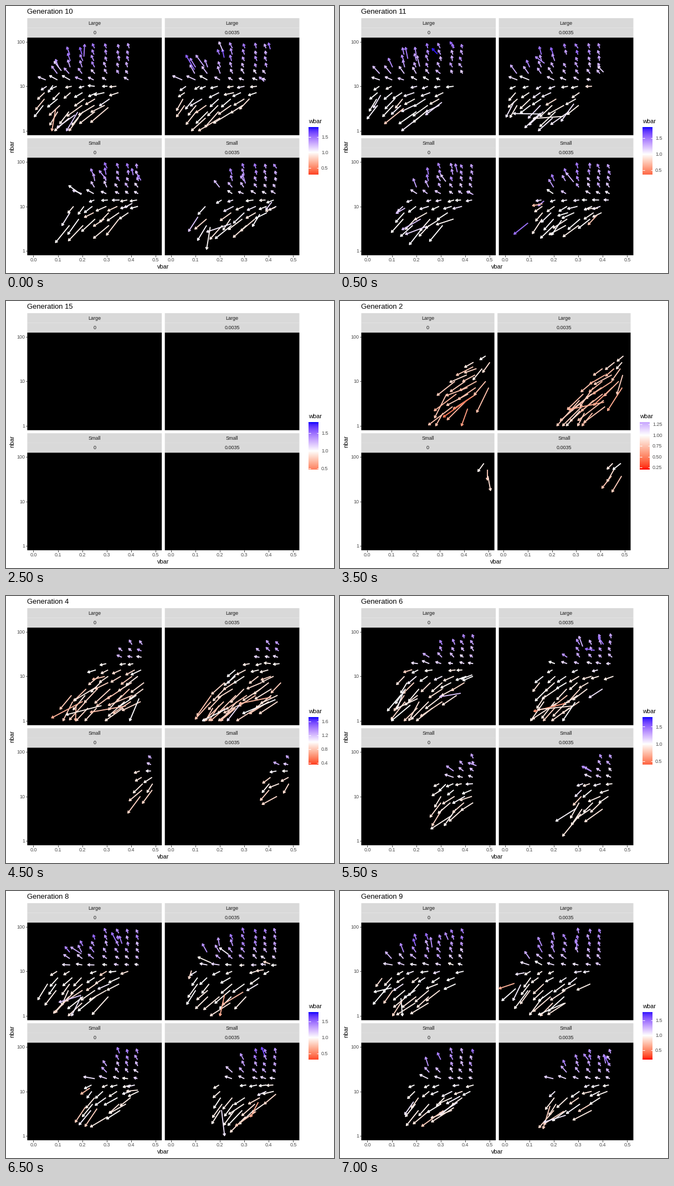
Write a matplotlib script that moves like this. It is 592 px wide and 483 px high and loops after 7500 ms.

```python
import numpy as np
import matplotlib.pyplot as plt
from matplotlib.animation import FuncAnimation
from matplotlib.collections import LineCollection
from matplotlib.patches import Rectangle

W, H, DPI = 592, 483, 100
PX = 72 / DPI
LEFT, TOP, GAP = 38.4, 22, 5.5
STRIP, TALL = 17.6, 176.5
DECADE = TALL / 2.2
FLOOR = TOP + 2 * STRIP + TALL - DECADE / 10    # height of nbar = 1
plt.rcParams["font.family"] = "Liberation Sans"

# How the cloud of arrows spreads: values at key generations, in pixels
KEYS = (1, 2, 4, 7, 10, 13)
CLOUD = {
    "Large": dict(left=(264, 195, 122, 102, 77, 76), right=(264, 262, 245, 240, 222, 220),
                  edge=(95, 170, 182, 142, 130, 118), top=(95, 99, 82, 78, 76, 75),
                  low_left=(150, 205, 200, 178, 178, 172), low_right=(150, 154, 187, 130, 140, 105),
                  hump=(0, 12, 10, 45, 42, 55), level=(65, 90, 118, 134, 141, 140)),
    "Small": dict(left=(264, 264, 240, 170, 125, 104), right=(264, 264, 261, 241, 240, 236),
                  edge=(72, 70, 104, 125, 142, 128), top=(72, 70, 74, 75, 74, 76),
                  low_left=(80, 105, 152, 183, 177, 157), low_right=(80, 105, 132, 152, 140, 136),
                  hump=(0, 0, 5, 20, 25, 30), level=(60, 60, 98, 127, 129, 137)),
}


def over(gen, keys, values):
    return np.interp(gen, keys, values)


def scale(gen):
    """Fitness range and legend step."""
    lo = over(gen, (1, 2, 4, 7, 9, 13, 15), (.3, .2, .35, .43, .19, .54, .47))
    hi = over(gen, (1, 2, 4, 7, 9, 13, 15), (1.2, 1.3, 1.72, 1.81, 1.78, 1.92, 1.82))
    return lo, hi, .25 if gen in (1, 2, 3, 7) else .4 if gen == 4 else .5


def palette(t):
    """Red - white - blue for t in -1..1, blended in CIE Lab."""
    t = np.clip(np.atleast_1d(t), -1, 1)[:, None]
    white, red, blue = np.array([[100, 0, 0], [53.24, 80.09, 67.2], [32.3, 79.19, -107.86]])
    L, a, b = (white + np.abs(t) * (np.where(t < 0, red, blue) - white)).T
    fy = (L + 16) / 116
    f = np.array([fy + a / 500, fy, fy - b / 200])
    xyz = np.where(f > 6 / 29, f ** 3, (f - 4 / 29) * 3 * (6 / 29) ** 2)
    xyz *= np.array([[.9505], [1], [1.089]])
    rgb = np.array([[3.2406, -1.5372, -.4986], [-.9689, 1.8758, .0415],
                    [.0557, -.204, 1.057]]) @ xyz
    rgb = np.clip(rgb, 0, 1)
    return np.where(rgb > .0031308, 1.055 * rgb ** (1 / 2.4) - .055, 12.92 * rgb).T


def tone(w, gen):
    lo, hi, _ = scale(gen)
    return palette((np.asarray(w) - 1) / max(1 - lo, hi - 1))


def flow(x, y, u, level, gen, rng, wild=1):
    """One arrow: upwards above the level, left along it, down-left below."""
    d = (level - y) / DECADE
    side = (1 - u) ** 2
    if d > 0:
        angle = 180 - 72 * np.tanh(d / over(gen, (4, 10), (.4, .23))) + rng.normal(0, 6 * wild)
        length = (8 + 10 * side) * wild ** .5
        w = 1.03 + .55 * (1 - np.exp(-d / .4)) * (1.1 - .35 * u)
    else:
        steep = over(x, (245, 265), (0, 35))
        angle = 180 + (33 + steep) * np.tanh(-d / .25) + 22 * side + rng.normal(0, 6 * wild)
        length = (9 - 40 * d) * wild ** .2
        w = 1.02 + over(gen, (2, 4, 7, 10, 13), (-.28, -.18, -.08, -.1, .08)) * np.tanh(-d / .4)
    length *= rng.uniform(.8, 1.2)
    dx, dy = np.cos(np.radians(angle)), -np.sin(np.radians(angle))
    if dy > 0:
        length = min(length, (FLOOR - y) / dy)
    return x, y, x + length * dx, max(y + length * dy, 65), w + rng.normal(0, .05 * wild)


def arrows(gen, size, costly):
    if gen == 15:
        return []
    rng = np.random.default_rng(gen * 10 + 2 * (size == "Small") + costly)
    c = {k: over(gen, KEYS, v) for k, v in CLOUD[size].items()}
    if size == "Small" and costly:
        c["left"] -= 10
    span = max(c["right"] - c["left"], 1)

    def outline(u):
        bend = over(gen, (4, 10), (1.4, 4))
        low = c["low_left"] + (c["low_right"] - c["low_left"]) * u
        return c["top"] + (c["edge"] - c["top"]) * (1 - u) ** bend, low + c["hump"] * np.sin(np.pi * u)

    out = []
    k = np.arange(1, 11)
    lattice = 49.5 + 22 * k - 4.5 * np.maximum(k - 7, 0) + over(gen, (1, 4, 7), (8, 6, 0))
    for x in lattice[(lattice > c["left"] - 10) & (lattice < c["right"] + 10)]:
        u = np.clip((x - c["left"]) / span, 0, 1)
        top, low = outline(u)
        for y in 65 + DECADE / 7 * np.arange(1, 14):
            below = y > c["level"]
            if top - 4 < y < low + 4 and rng.random() > (.15 if below else .1 * (1 - u)):
                jitter = rng.normal(0, 3 if below else .8)
                out.append(flow(x + jitter, y, u, c["level"], gen, rng))

    # a few strays around the rim of the cloud
    for u in rng.uniform(-.15, 1.05, int(over(span, (20, 120), (0, 7)))):
        top, low = outline(np.clip(u, 0, 1))
        y = low + rng.uniform(-15, 5) if rng.random() < .6 else top + rng.uniform(0, 30)
        out.append(flow(c["left"] + u * span, min(y, 203), np.clip(u, 0, 1),
                        c["level"], gen, rng, wild=3))
    return out


def draw_arrows(items, dx, dy, gen):
    lines, tones = [], []
    for x, y, u, v, w in items:
        turn = np.arctan2(y - v, x - u)
        head = [(u + 4.5 * np.cos(turn + s), v + 4.5 * np.sin(turn + s))
                for s in (-np.pi / 6, np.pi / 6)]
        c = tone(w, gen)[0]
        lines += [[(x, y), (u, v)], [head[0], (u, v), head[1]]]
        tones += [c, c]
    lines = [np.array(p) + (dx, dy) for p in lines]
    ax.add_collection(LineCollection(lines, colors=tones, linewidths=1.9 * PX,
                                     joinstyle="round", capstyle="butt", zorder=3))


def text(x, y, s, size=9, color="#4D4D4D", ha="center", va="center_baseline", **kw):
    ax.text(x, y, s, size=size * PX, color=color, ha=ha, va=va, **kw)


def rect(x, y, w, h, color):
    ax.add_patch(Rectangle((x, y), w, h, fc=color, lw=0, snap=False))


def line(xs, ys, color="#333333"):
    ax.plot(xs, ys, color=color, lw=1.07 * PX, solid_capstyle="butt", zorder=4)


def legend(gen, left):
    lo, hi, step = scale(gen)
    top, tall = 219, 86
    text(left, 208.5, "wbar", 11, "black", "left")
    ramp = tone(np.linspace(hi, lo, tall), gen)[:, None]
    ax.imshow(ramp, extent=(left, left + 18, top + tall, top),
              aspect="auto", interpolation="nearest", zorder=2)
    for k in range(int(np.ceil(lo / step)), int(hi / step) + 1):
        y = top + tall * (hi - k * step) / (hi - lo)
        line((left, left + 3.5), (y, y), "white")
        line((left + 14.5, left + 18), (y, y), "white")
        text(left + 23, y - .4, f"{k * step:.{2 if step == .25 else 1}f}", ha="left")


def draw(i):
    gen = (i + 9) % 15 + 1
    narrow = scale(gen)[2] == .25
    right = 524.5 if narrow else 529.5
    width = (right - LEFT - GAP) / 2
    ax.clear()
    ax.axis("off")
    text(38, 14, f"Generation {gen}", 13, "black", "left", va="baseline")
    text((LEFT + right) / 2, 475, "vbar", 11, "black", va="baseline")
    text(11.2, 253.5, "nbar", 11, "black", va="center", rotation=90)
    for row, size in enumerate(("Large", "Small")):
        dy = row * (2 * STRIP + TALL + GAP)
        for col, cost in enumerate(("0", "0.0035")):
            dx = col * (width + GAP)
            x, y = LEFT + dx, TOP + dy
            rect(x, y, width, STRIP, "#D9D9D9")
            rect(x, y + STRIP, width, STRIP, "#D9D9D9")
            rect(x, y + 2 * STRIP, width, TALL, "black")
            text(x + width / 2, y + 8.4, size, color="#1A1A1A")
            text(x + width / 2, y + 25.7, cost, color="#1A1A1A")
            draw_arrows(arrows(gen, size, col), dx, dy, gen)
            for k in range(6 * row):
                tx = x + width * (.025 + k / 10) / .55
                line((tx, tx), (451, 453.7))
                text(tx, 458.8, f"{k / 10:.1f}")
        for k in range(3):
            ty = FLOOR + dy - k * DECADE
            line((35.7, LEFT), (ty, ty))
            text(34, ty - .6, str(10 ** k), ha="right")
    legend(gen, 541 if narrow else 546)
    ax.set_xlim(0, W)
    ax.set_ylim(H, 0)
    return []


fig = plt.figure(figsize=(W / DPI, H / DPI), dpi=DPI, facecolor="white")
ax = fig.add_axes([0, 0, 1, 1])
anim = FuncAnimation(fig, draw, frames=15, interval=500, init_func=lambda: [],
                     repeat=True, repeat_delay=0, blit=False)
plt.show()
```
